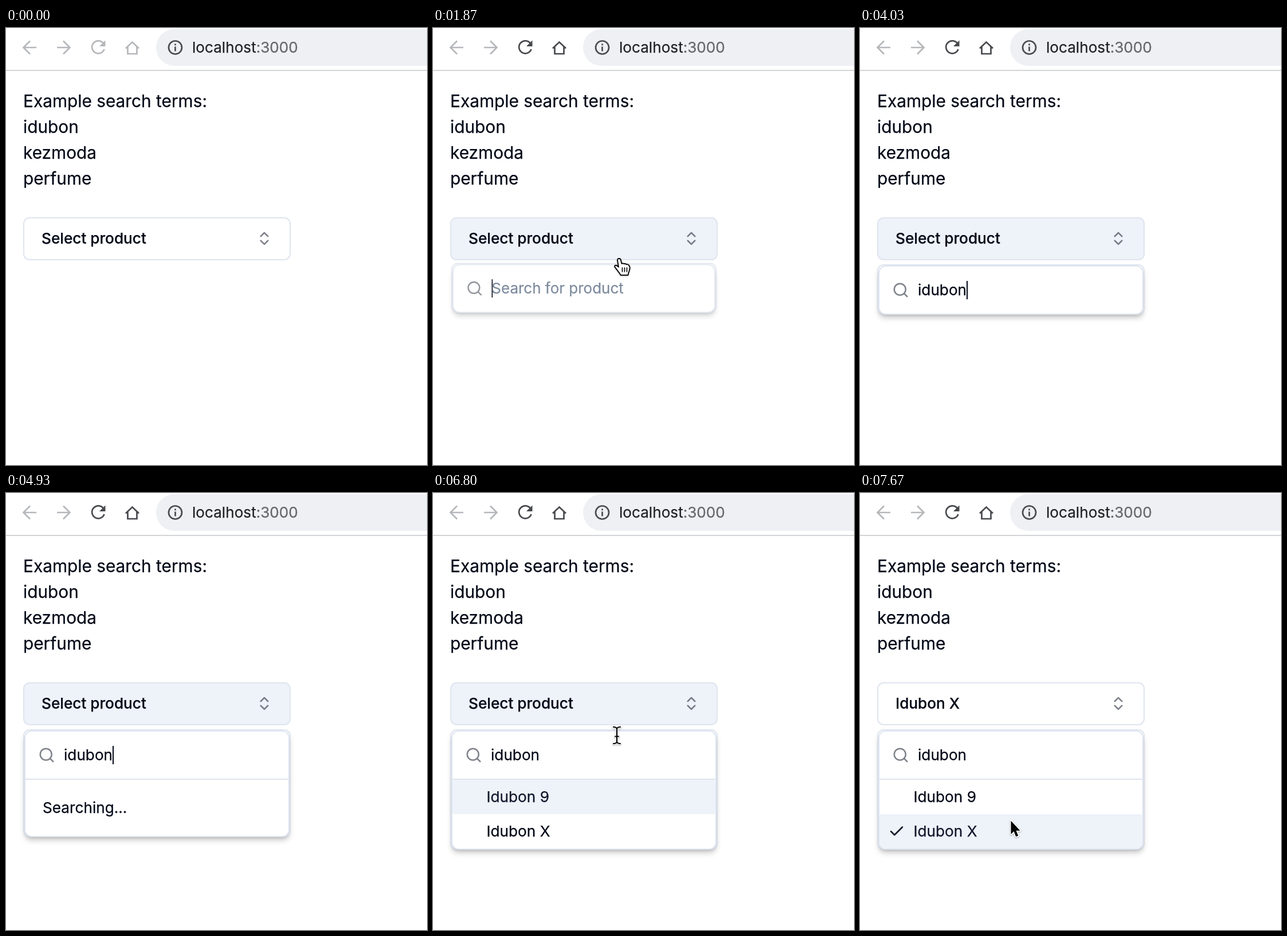
Animation, 735 px wide and 762 px high, one loop 8 s. Source, as an HTML page:

```html
<!DOCTYPE html>
<html lang="en">
<head>
<meta charset="utf-8">
<title>Product search</title>
<style>
  * { box-sizing: border-box; }
  html, body { margin: 0; width: 100%; height: 100%; overflow: hidden; background: #fff; }
  body {
    position: relative; color: #020817; white-space: pre;
    font: 26.2px/38px Inter, Roboto, sans-serif;
    font-optical-sizing: none; font-variation-settings: "opsz" 14;
    -webkit-text-stroke: .25px;
  }
  body > *, #button > *, #search > *, .item > * { position: absolute; }
  svg { fill: none; stroke: currentColor; stroke-width: 2; stroke-linecap: round; stroke-linejoin: round; overflow: visible; }
  .icon { width: 30px; height: 30px; }
  .dim { opacity: .5; }
  #bar { left: 0; top: 0; stroke-width: 2.7; stroke-linecap: butt; stroke-linejoin: miter; color: #b5b7ba; }
  #url { left: 325px; top: 15px; font-size: 26.15px; color: #202124; }
  #url span { color: #64676c; }
  #terms { left: 30px; top: 105px; font-size: 29.8px; line-height: 44.9px; transform: translateY(-.5px); }
  #button { left: 30px; top: 329.5px; width: 467px; height: 75px; border: 2px solid #dfe5ef; border-radius: 11px; font-weight: 500; }
  #label { left: 30px; top: 16.5px; }
  #popover, #panel {
    border: 2px solid #dfe5ef; background: #fff;
    box-shadow: 0 7.5px 11px -2px #0000001a, 0 3.7px 7.5px -3.7px #0000001a;
  }
  #popover { left: 30px; top: 412px; width: 467px; border-radius: 11px; transform-origin: top; }
  #panel { margin-bottom: -2px; border-radius: 13px; overflow: hidden; }
  #search { position: relative; height: 82px; }
  #field { left: 67px; top: 22px; }
  #hint { left: 67px; top: 22px; color: #64748b; }
  #caret { position: absolute; top: 3px; width: 2px; height: 32px; background: #020817; }
  #list { border-top: 2px solid #dfe5ef; }
  #wait { height: 98px; padding: 30px; }
  .item { position: relative; height: 60px; padding: 11px 0 0 59.5px; border-radius: 4px; }
  .item.on { background: #eef2f9; color: #0f172a; }
  #check { left: 15px; top: 15px; }
  #pointer { left: 0; top: 0; width: 1px; height: 1px; filter: drop-shadow(0 1px 1px #0005); }
</style>
</head>
<body>
<svg id="bar" width="735" height="76">
  <path d="M0 74H735" stroke="#d2d4d7" stroke-width="2"/>
  <rect x="262" y="2" width="520" height="64" rx="32" fill="#eef0f4" stroke="none"/>
  <path d="M53 34H31M42 22.5L30.5 34 42 45.5M89 34h22M100 22.5L111.500 34 100 45.500"/>
  <g id="tools">
    <path d="M170.500 27.500A11 11 0 1 0 171.500 37"/>
    <path d="M173.500 21.500V32H163z" fill="currentColor" stroke="none"/>
    <path d="M209 35.500L220.500 24.500 232 35.500M212.500 33V45H228.500V33"/>
  </g>
  <g color="#4a4c50">
    <circle cx="295.500" cy="34" r="11.500"/>
    <path d="M295.500 32.500V40.500M295.500 27.500V30.300"/>
  </g>
</svg>
<div id="url">localhost<span>:3000</span></div>
<div id="terms">Example search terms:
idubon
kezmoda
perfume</div>

<div id="button">
  <span id="label"></span>
  <svg class="icon dim" viewBox="0 0 24 24" style="left:403.500px;top:20.500px"><path d="M7 15l5 5 5-5M7 9l5-5 5 5"/></svg>
</div>

<div id="popover"><div id="panel"><div id="search"><svg class="icon dim" viewBox="0 0 24 24" style="left:22px;top:26px"><circle cx="11" cy="11" r="8"/><path d="M21 21l-4.300-4.300"/></svg><span id="hint">Search for product</span><span id="field"><span id="typed"></span><i id="caret"></i></span></div><div id="list"><div id="wait">Searching...</div><div id="items"><div class="item" id="first">Idubon 9</div><div class="item" id="second"><svg id="check" class="icon" viewBox="0 0 24 24"><path d="M20 6L9 17l-5-5"/></svg>Idubon X</div></div></div></div></div>

<svg id="pointer">
  <g id="arrow">
    <path d="M.5 .5V24L5.500 19 9.300 28.300 13.300 26.600 9.500 17.700H16.500Z" fill="#000" stroke="#fff" stroke-width="3.400" paint-order="stroke"/>
  </g>
  <g id="hand" stroke="#000" stroke-width="1.800">
    <path d="M-3 3q0-3 3-3 2.500 0 3 3l1.500 6q2-1.500 4 .3 2.500-1 4 1 3-.8 4.500 1.500 2 2 1.500 6l-1 4q-1.500 3-2 7h-13q-1-3-4-6l-6-8q-1-2.500 1-3 2.500-.5 5.500 3z" fill="#fff"/>
    <path d="M5.500 16v7M9.500 16v7M13.500 16v7" stroke-width="1.600"/>
  </g>
  <g id="beam">
    <path id="stem" d="M-6-14.500q5 0 6 3 1-3 6-3M0-11.500v23M-6 14.500q5 0 6-3 1 3 6 3M-3 2h6" stroke="#fff" stroke-width="4.500"/>
    <path id="ink" stroke="#000" stroke-width="2.200"/>
  </g>
</svg>

<script>
const LOOP = 8000, WORD = "idubon";
const KEYS = [3270, 3500, 3600, 3700, 3830, 3930];
const OPEN = 1830, SEARCH = 4430, FOUND = 6000, PICK = 7670;
const $ = id => document.getElementById(id);
const show = (id, on) => $(id).style.display = on ? "" : "none";
const ramp = (t, start, length) => Math.min(1, Math.max(0, (t - start) / length));
const easeOut = p => 1 - (1 - p) ** 4;
const easeInOut = p => p * p * (3 - 2 * p);
const mix = (a, b, p) => a + (b - a) * p;

$("ink").setAttribute("d", $("stem").getAttribute("d"));

function caretOn(t) {
  if (t < KEYS[0]) return t < 2300 || t >= 2800;
  if (t < KEYS[5]) return true;
  return t < 7430 && Math.floor((t - KEYS[5]) / 500) % 2 === 0;
}

function drawPointer(t) {
  let x, y, shape = "";
  if (t >= 800 && t < KEYS[0]) {
    const p = easeOut(ramp(t, 790, 400));
    x = mix(453, 325, p);
    y = mix(612, 402, p);
    shape = t < 1040 ? "arrow" : "hand";
  } else if (t >= 6800) {
    const p = easeInOut(ramp(t, 6800, 430));
    x = mix(321, 263, p);
    y = mix(422.5, 571, p);
    shape = y < 498 ? "beam" : "arrow";
  }
  for (const id of ["arrow", "hand", "beam"]) show(id, id === shape);
  if (shape) $("pointer").style.transform = `translate(${x}px, ${y}px)`;
  return y;
}

function draw(t) {
  $("tools").style.color = t < 630 ? "#b5b7ba" : "#47494d";

  const hover = ramp(t, 1040, 150) * (1 - ramp(t, 6830, 150));
  $("button").style.backgroundColor = `rgba(238, 242, 249, ${hover})`;
  $("label").textContent = t < PICK ? "Select product" : "Idubon X";

  const p = easeOut(ramp(t, OPEN - 20, 170));
  show("popover", t >= OPEN);
  $("popover").style.opacity = p;
  $("popover").style.transform = p < 1 ? `translateY(${-15 * (1 - p)}px) scale(${mix(.95, 1, p)})` : "none";

  const count = KEYS.filter(k => t >= k).length;
  $("typed").textContent = WORD.slice(0, count);
  show("hint", count === 0);
  show("caret", caretOn(t));

  show("list", t >= SEARCH);
  show("wait", t < FOUND);
  show("items", t >= FOUND);
  const second = drawPointer(t) > 560;
  $("first").classList.toggle("on", !second);
  $("second").classList.toggle("on", second);
  show("check", t >= PICK);
}

function frame() {
  draw(performance.now() % LOOP);
  requestAnimationFrame(frame);
}
frame();
</script>
</body>
</html>
```
